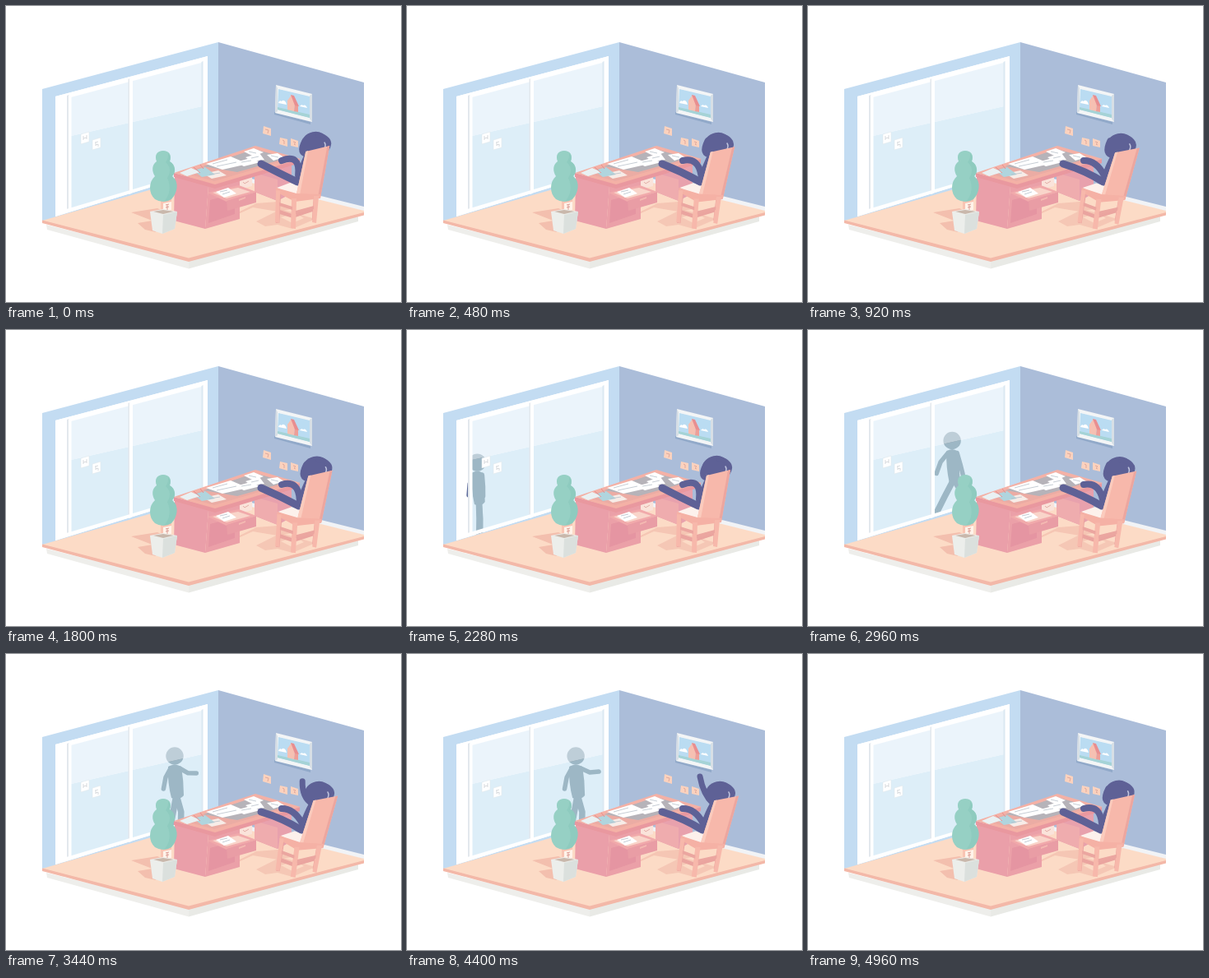
Recreate the animation shown at these times as an HTML page. Size 480 by 360 pixels, loop 5000 ms.

```html
<!DOCTYPE html>
<html lang="en">
<head>
<meta charset="utf-8">
<title>Office</title>
<style>
html, body { margin: 0; width: 100%; height: 100%; overflow: hidden; background: #fff; }
svg { display: block; width: 100vw; height: 100vh; }
.limb { fill: none; stroke-linecap: round; stroke-linejoin: round; }
</style>
</head>
<body>
<svg viewBox="0 0 480 360" xmlns="http://www.w3.org/2000/svg">
  <defs>
    <clipPath id="gap"><path d="M61 111 76 107V251L61 255Z"/></clipPath>
    <clipPath id="panes"><path d="M76 107 245 61V200L76 251Z"/></clipPath>
    <g id="walker" stroke="currentColor" fill="currentColor">
      <path id="wLegA" class="limb" stroke-width="7.5"/>
      <path id="wLegB" class="limb" stroke-width="7.5"/>
      <path id="wArmA" class="limb" stroke-width="5.5"/>
      <path id="wBody" stroke="none" d="M-8 13Q0 8 8 13Q11 30 11 48Q5 55-4 51Q-9 32-8 13Z"/>
      <path id="wArmB" class="limb" stroke-width="5.5"/>
      <circle r="10.7" stroke="none"/>
    </g>
  </defs>

  <!-- room shell -->
  <path fill="#eeeeeb" d="M49 266 222 309V319.500L50 272Z"/>
  <path fill="#e9eae6" d="M222 309 428 256V262L222 319.500Z"/>
  <path fill="#c3dcf2" d="M44 101 258 44V206L44 262Z"/>
  <path fill="#abbdd9" d="M258 44 435 93V248L258 206Z"/>
  <path fill="#fcdbc6" d="M44 261 258 200 435 248V252L222 307 44 262Z"/>
  <path fill="#f3b8a8" d="M44 260.500 222 306.500 435 251V254.500L222 311 44 264Z"/>
  <path fill="#f1f3f6" d="M258 200 435 244V249L258 205Z"/>

  <!-- window -->
  <path fill="#fff" d="M60 110 245 61V199L60 256Z"/>
  <g clip-path="url(#gap)" color="#5e6c9c"><use href="#walker"/></g>
  <g clip-path="url(#panes)" color="#5f7680"><use href="#walker"/></g>
  <path fill="#c6e3f3" opacity=".6" d="M79 158 238 122V200L79 249Z"/>
  <path fill="#e3f0fa" opacity=".72" d="M79 108 238 66V122L79 158Z"/>
  <path fill="#fff" d="M60 110 245 61V67L60 116Z"/>
  <path fill="#e3e8ed" d="M74 109 76.500 108V249L74 250ZM148.500 89 150.500 88V228L148.500 229Z"/>
  <path fill="#fff" d="M76 109 79.500 108V249L76 250ZM150 88 154 87V227L150 229ZM240 63 245 61V199L240 201ZM60 251 245 196V199L60 256Z"/>
  <path fill="#dbe8f2" d="M237.500 68 239.500 67V200H237.500Z"/>
  <g fill="#fff" stroke="#dfe7ec" stroke-width=".6">
    <path d="M91 156 101 153V165L91 168ZM105 163 115 160V172L105 175Z"/>
    <path fill="none" stroke="#bfc4c9" d="M94 158V163M98 157V162M94 161 98 160M108 166 112 165M109 170V166M109 169 112 168V171"/>
  </g>

  <!-- picture and wall notes -->
  <path fill="#91a9c9" d="M326 129 370 141V144L326 132Z"/>
  <path fill="#f3f5f6" d="M328 96 372 107V141L327 130Z"/>
  <path fill="#d7dfe5" d="M328 96 330 100V128L327 130ZM369 137 372 141V107L369 109Z"/>
  <path fill="#badcf2" d="M331 101 369 110V136L330 126Z"/>
  <path fill="#a5d3d6" d="M330 123 369 132V136L330 126Z"/>
  <path fill="#fff" d="M331 118q1-4 4-2 2-3 5 1l1 3-10-2ZM357 122q2-3 4-1 3-2 5 3l-9-2Z"/>
  <path fill="#f6c0b2" d="M342 115 347 108 351 119 350 128 342 126Z"/>
  <path fill="#ee9f98" d="M351 119 355 121V129L350 128Z"/>
  <path fill="#e88e90" d="M346 108 350 109 356 122 351 121Z"/>
  <g fill="#fbd2be">
    <path d="M313 146 322 149V158L312 155ZM333 160 342 162V171L332 168ZM346 161 355 164V172L346 170Z"/>
    <path fill="none" stroke="#dfa99c" d="M315 150 319 151 318 155M336 163 338 164V168M349 165 352 166 350 168 352 169"/>
  </g>

  <!-- floor shadows -->
  <g fill="#f3bfae">
    <path d="M152 251 184 246 205 256 180 262ZM160 264 178 261 182 275 169 272Z"/>
    <path d="M242 271 304 240 330 238 347 247 330 250 300 245Z" opacity=".75"/>
    <path d="M304 262 334 247 376 259 348 271 330 266 315 268Z" opacity=".7"/>
  </g>
  <path fill="#fcdbc6" d="M334 257 352 252 362 258 348 264Z"/>

  <!-- desk -->
  <path fill="#e8a1ad" d="M302 203 347 191V228L330 237 302 226Z"/>
  <path fill="#efacae" d="M302 203 330 211V237L302 226Z"/>
  <path fill="#fae3da" d="M283 209 299 206V219L283 223Z"/>
  <path fill="none" stroke="#e3afa8" d="M288 214 290 216 295 213"/>
  <path fill="#ea9fa9" d="M205 207 246 219 242 271 204 261Z"/>
  <path fill="#eba0a8" d="M246 219 284 210V259L242 271Z"/>
  <path fill="#e595a2" d="M248 236 278 228V253L246 264Z"/>
  <path fill="#f1aaab" d="M245 227 283 218 304 226 268 238Z"/>
  <path fill="#f9d5ca" d="M251 227 282 221 297 226 268 234Z"/>
  <path fill="#fff" d="M255 226 270 221 280 228 265 233Z"/>
  <path fill="none" stroke="#b5bfc9" stroke-width=".8" d="M260 226 269 224M263 229 272 226"/>
  <path fill="#e99da5" d="M268 237 304 226V239L269 249Z"/>
  <path fill="#f4b9b2" d="M283 235 291 232V234L283 237Z"/>
  <path fill="#e9989f" d="M204 203 254 216 357 186V191L254 222 204 208Z"/>
  <path fill="#f4b1a6" d="M204 203 303 170 358 186 254 217Z"/>
  <path fill="#ebaca4" d="M216 203 302 174 345 186 253 213Z"/>
  <path fill="#b6b3b9" d="M240 195 302 174 341 185 281 202Z"/>
  <g fill="#fff">
    <path d="M243 192 273 183 294 192 263 199ZM279 190 297 185 309 190 289 195Z"/>
    <path d="M289 177 301 173 313 178 301 183ZM291 184 308 179 314 187 298 189ZM317 181 330 179 338 184 325 188Z"/>
    <path fill="#f7ece7" d="M240 204 258 200 268 206 250 210Z"/>
    <path fill="#b0d5de" d="M228 200 242 196 254 205 238 208Z"/>
    <path fill="#e9f1f3" d="M211 203 225 197 236 202 220 207Z"/>
    <path fill="none" stroke="#b8c1c9" stroke-width=".8" d="M251 192 269 187M256 195 280 190M286 190 298 188M295 177 304 179M298 185 307 183M322 182 331 184M247 205 260 203"/>
    <path fill="none" stroke="#e58e8e" d="M228 196 236 203M236 193 240 198"/>
  </g>

  <!-- plant -->
  <path fill="#f8c4b3" d="M188 234H201V253H188Z"/>
  <path fill="#fff3ea" d="M191 240 201 238V248L191 250Z"/>
  <path fill="none" stroke="#dc9c94" d="M194 242 198 241M194 245 198 244M196 242V248"/>
  <path fill="#96d0c4" d="M191 176C198 176 202 181 199 189C206 193 207 202 202 207C211 214 208 228 201 235Q191 241 181 235C173 228 173 214 181 207C177 201 177 193 183 189C180 181 184 176 191 176Z"/>
  <path fill="#82c3b7" d="M197 179C201 183 200 187 199 189C206 193 207 202 202 207C211 214 208 228 201 235Q197 238 192 238Q203 225 196 209Q203 198 194 190Q198 185 197 179Z" opacity=".4"/>
  <path fill="#eceeeb" d="M175 250 191 247 208 250 205 271 190 277 178 273Z"/>
  <path fill="#dbe0dd" d="M191 254 208 250 205 271 190 277Z"/>
  <path fill="#c9b8ac" d="M179 250 191 248 204 250 191 253Z"/>

  <!-- sitter and chair -->
  <g class="chair" stroke="#eaa49f" stroke-width="4.500" fill="none">
    <path d="M332 224 330 264M376 231 374 260M331 250 350 256M350 255 374 247"/>
  </g>
  <g stroke="#5e6196" fill="#5e6196">
    <path id="legFar" class="limb" stroke-width="8"/>
    <path id="torso" class="limb" stroke-width="15"/>
  </g>
  <g class="chair">
    <path fill="#fdf1ec" d="M329 221 345 215 380 224 352 232Z"/>
  </g>
  <g stroke="#5e6196" fill="#5e6196">
    <path id="legNear" class="limb" stroke-width="9"/>
    <path id="arm" class="limb" stroke-width="7"/>
    <g id="head">
      <ellipse cx="375" cy="166" rx="16" ry="13" stroke="none" transform="rotate(-12 375 166)"/>
      <path class="limb" stroke-width="5.500" d="M386 179Q396 168 390 162Q386 157 378 158"/>
      <path class="limb" stroke="#c2c6df" stroke-width="1.500" d="M387 166Q389 169 387 173"/>
    </g>
  </g>
  <g class="chair">
    <path fill="#f7b8ab" d="M364 177 393 170 382 233 353 228Z"/>
    <path fill="#fbcbbd" d="M364 177 367 176 357 229 353 228Z"/>
    <path fill="#eca69f" d="M390 171 393 170 382 233 379 232Z"/>
    <path fill="#f5b1a5" d="M328 221 353 228 382 229V234L351 238 328 226Z"/>
    <path fill="#f7b8ab" d="M328 224 333 225 332 264 327 263ZM347 234 353 234 352 271 346 270ZM374 231 380 231 377 264 372 263Z"/>
    <path fill="#eba6a0" d="M332 239 348 244V248L332 243ZM352 249 374 243V247L352 253Z"/>
  </g>
</svg>
<script>
const LOOP = 5000, STOP = 3600, GO = 4400, PACE = 0.132;
const el = id => document.getElementById(id);
const chairs = document.querySelectorAll('.chair');
const mix = (a, b, k) => a + (b - a) * k;
const ease = (t, from, to) => {
  const k = Math.min(1, Math.max(0, (t - from) / (to - from)));
  return k * k * (3 - 2 * k);
};
const line = (id, ...p) => el(id).setAttribute('d', 'M' + p.join(' '));
const curve = (id, x, y, cx, cy, ex, ey) =>
  el(id).setAttribute('d', `M${x} ${y}Q${cx} ${cy} ${ex} ${ey}`);

// lean: 0 is forward, 1 is tipped back; feet stay on the desk
function sitter(lean, wave) {
  const a = 0.04 * lean, b = 0.105 * lean;
  const tilt = `matrix(1 ${a} ${-b} 1 ${b * 268} ${-a * 330})`;
  chairs.forEach(c => c.setAttribute('transform', tilt));
  el('head').setAttribute('transform', `translate(${mix(0, 4, lean)} ${mix(0, 2, lean)})`);
  const hip = mix(354, 359, lean);
  curve('torso', mix(371, 376, lean), mix(180, 183, lean), hip + 9, 197, hip + 5, 211);
  curve('legNear', 310, 192, mix(331, 337, lean), mix(203, 200, lean), hip, 214);
  curve('legFar', 335, 188, mix(358, 350, lean), mix(179, 188, lean), hip + 1, 206);
  // resting: elbow out, hand behind the head
  curve('arm', mix(368, 372, lean), mix(180, 182, lean),
    mix(mix(354, 359, lean), 360, wave), mix(181, 171, wave),
    mix(mix(363, 367, lean), 356, wave), mix(164, 149, wave));
}

function walkerLeg(id, s) {
  line(id, 2, 47, 3 + 12 * s, 68, s < 0 ? 3 + 21 * s : 3 + 11 * s, 89 - 3 * Math.abs(s));
}

function walker(t) {
  const halt = 205;
  const x = t < GO ? Math.min(halt, 175 + (t - 2960) * PACE) : halt + (t - GO) * PACE;
  const shown = x > 35 && x < 275;
  el('walker').style.display = shown ? '' : 'none';
  if (!shown) return;
  const still = ease(t, 3080, 3230) * (1 - ease(t, GO, GO + 150));
  const s = Math.cos((x - 175) / 72 * 2 * Math.PI) * (1 - still) + 0.4 * still;
  const bob = Math.abs(s) * 1.2 * (1 - still);
  el('walker').setAttribute('transform', `translate(${x} ${124 + (halt - x) * 0.31 + bob})`);
  el('wBody').setAttribute('transform', `scale(${mix(0.85, 1, still)} 1)`);
  walkerLeg('wLegA', -s);
  walkerLeg('wLegB', s);
  const hail = ease(t, 3180, 3500) * (1 - ease(t, GO, GO + 300));
  line('wArmA', -5, 15, -9 - 5 * s, 26, -10 - 9 * s, 40);
  line('wArmB', 6, 15, mix(7 + 3 * s, 17, hail), mix(29, 20, hail),
    mix(7 + 6 * s, 28, hail), mix(41, 19, hail));
}

function draw(t) {
  const rt = t < STOP ? t : t < GO ? STOP : STOP + t - GO;
  const lean = (1 - Math.cos((rt - 2280) / 2400 * 2 * Math.PI)) / 2;
  sitter(lean, ease(t, 3250, 3580) * (1 - ease(t, GO, GO + 350)));
  walker(t);
}

function tick() {
  draw(performance.now() % LOOP);
  requestAnimationFrame(tick);
}
tick();
</script>
</body>
</html>
```
